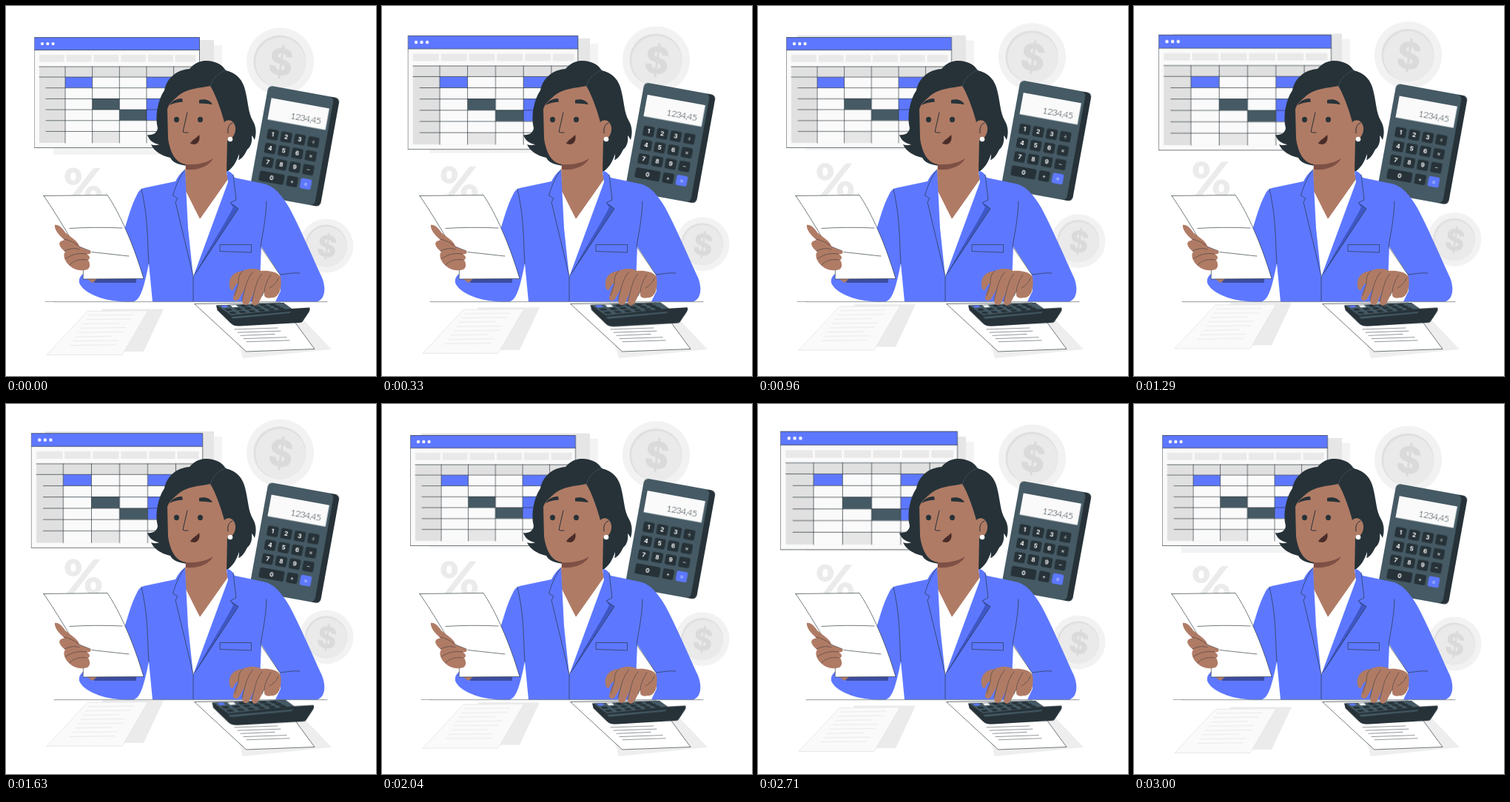
An HTML page for the animation above (3040 ms loop, 500 by 500 pixels).

```html
<!DOCTYPE html>
<html lang="en">
<head>
<meta charset="utf-8">
<title>Bookkeeping</title>
<style>
  html, body { margin: 0; width: 100%; height: 100%; overflow: hidden; background: #fff; }
  svg { display: block; width: 100vw; height: 100vh; }
  text { text-anchor: middle; }

  .float, .bob, .window, .pocket-calc, .line-end { animation: 3040ms linear infinite; }
  .float { animation-name: float; }
  .bob { animation-name: bob; }
  .window { animation-name: beat-late; transform-origin: 150px 117px; }
  .pocket-calc { animation-name: beat; transform-origin: 347px 416.5px; }
  .line-end { animation-name: blink; animation-timing-function: step-end; }

  /* 98.68% is the 3 s mark; the rest of the loop is a short hold. */
  @keyframes float {
    0%, 98.68%, 100% { transform: translateY(0); }
    49.34% { transform: translateY(-10px); }
  }
  @keyframes bob {
    0%, 49.34%, 98.68%, 100% { transform: translateY(0); }
    24.67%, 74.01% { transform: translateY(-10px); }
  }
  @keyframes beat {
    0%, 14.8%, 19.74%, 29.6%, 49.34%, 64.14%, 69.08%, 78.95%, 100% { transform: scale(1); }
    4.93%, 24.67%, 54.28%, 74.01% { transform: scale(1.1); }
  }
  @keyframes beat-late {
    0%, 2.47%, 12.34%, 32.07%, 46.87%, 51.81%, 61.68%, 81.41%, 96.21%, 100% { transform: scale(1); }
    7.4%, 37.01%, 56.74%, 86.35% { transform: scale(1.1); }
  }
  @keyframes blink {
    0%, 12.34%, 46.87%, 61.68%, 96.21%, 100% { opacity: 1; }
    2.47%, 32.07%, 51.81%, 81.41% { opacity: 0; }
  }

  .blue { fill: #5d78ff; }
  .dark { fill: #263238; }
  .slate { fill: #455a64; }
  .skin { fill: #b07b65; }
  .ink { fill: none; stroke: #263238; stroke-width: .65; stroke-linecap: round; stroke-linejoin: round; }
  .fine { stroke-width: .5; }
  .sign { font: 800 50px Inter, sans-serif; dominant-baseline: central; fill: #dadada; }
  .key { font: 700 8px Inter, sans-serif; dominant-baseline: central; fill: #fff; }
  .op { font-weight: 400; }
</style>
</head>
<body>
<svg viewBox="0 0 500 500">
  <!-- backdrop -->
  <g class="float">
    <path fill="#f3f3f3" d="M64 53H292V201H64Z"/>
    <path fill="#e6e6e6" d="M53 46H281V191H53Z"/>
    <text x="104.500" y="266" style="font:900 65px Lato,sans-serif" fill="#ebebeb">%</text>
    <g id="coin">
      <circle cx="370.500" cy="75" r="45.500" fill="#f2f2f2"/>
      <circle cx="370" cy="75" r="35.500" fill="#dfdfdf"/>
      <circle cx="371" cy="76.500" r="34" fill="#eaeaea"/>
      <text class="sign" transform="translate(371.500 75.500) rotate(8)">$</text>
    </g>
    <use href="#coin" transform="translate(433 324) scale(.8) translate(-370.500 -75)"/>
  </g>

  <!-- spreadsheet -->
  <g class="window">
    <path fill="#fafafa" d="M38.500 42.500H261.500V191.500H38.500Z"/>
    <path class="blue" d="M38.500 42.500H261.500V59.500H38.500Z"/>
    <g fill="#fff"><circle cx="49" cy="51" r="2.100"/><circle cx="56.300" cy="51" r="2.100"/><circle cx="63.600" cy="51" r="2.100"/></g>
    <g id="tabs" fill="#e9e9e9"></g>
    <path fill="#e0e0e0" d="M45 82H257V185H45Z"/>
    <path fill="#fafafa" d="M80 96H257V185H80Z"/>
    <path fill="#e6e6e6" d="M116.600 169.500H153.300V185H116.600Z"/>
    <path class="blue" d="M80 96h36.600v14.600H80ZM190 96h36.600v14.600H190ZM190 125h36.600v29.500H190Z"/>
    <path class="slate" d="M116.600 125H153.300V140H116.600ZM153.300 140H190V154.500H153.300Z"/>
    <path id="grid" class="ink"/>
    <path class="ink" d="M45 82H257M38.500 59.500H261.500M38.500 42.500H261.500V191.500H38.500Z"/>
  </g>

  <!-- large calculator -->
  <g class="bob">
    <g transform="translate(354.700 107.300) rotate(10.300)">
      <rect class="dark" x="2" width="96" height="149" rx="6"/>
      <rect class="slate" width="90" height="149" rx="6"/>
      <path fill="#fafafa" d="M7 16H86.500V45.500H7Z"/>
      <text x="57.500" y="38.500" style="font:300 12.500px Lato,sans-serif;letter-spacing:-.7px" fill="#263238">1234,45</text>
      <g id="keys"></g>
    </g>
  </g>

  <!-- desk papers -->
  <g class="float">
    <path fill="#ebebeb" d="M130 409.500H213L186 467H112Z"/>
    <path fill="#fafafa" stroke="#e4e4e4" stroke-width=".8" d="M110 412.500 192 411.500 157 471.500H55Z"/>
    <path id="faint" fill="none" stroke="#e6e6e6" stroke-width=".8"/>
  </g>
  <path fill="#eee" d="M257 406 300 404 320 476 440 464 400 422 376 408Z"/>
  <path class="ink" style="fill:#fff" d="M255 402.500 371 401 417 463.500 325 467Z"/>
  <path id="notes" class="ink fine"/>

  <!-- hair, face and neck -->
  <path class="dark" d="M268 74C283 73 293 80 297 87C313 91 320 101 323 113C328 133 327 144 334 156C339 165 338 174 336 181C334 177 333 176 332 175C333 183 331 190 326 194C322 202 318 207 314 208C315 205 315 202 315 200C311 212 306 219 299 224L245 216C231 214 225 211 222 205C209 202 200 196 196 187C201 189 205 188 207 187C199 186 193 181 191 174C198 175 204 172 205 165C201 149 205 127 214 114C218 95 233 86 248 85C254 78 260 75 268 74Z"/>
  <path class="skin" d="M218 139C221 130 227 127 233 121C245 111 262 111 276 108C282 117 290 138 295 157C301 151 309 156 310 164C311 173 305 181 299 181L298 226 303 240 262 288 240 250 243 214C230 212 222 200 219 179Z"/>
  <path fill="#7e5045" d="M243 214C257 215 271 212 280 206C274 217 261 222 243 221Z"/>
  <path class="ink" style="stroke:#455a64" d="M296 87C286 91 279 98 276 109"/>
  <path class="ink" d="M306 158C301 160 299 165 300 172M245 144 239 170Q242 172 246 171" style="stroke-width:1"/>
  <path class="dark" d="M221 134C225 127 232 125 238 125L239 129.500C233 130 227 131 221 134ZM261 127C269 125 276 127 279 133C273 132 267 131.500 261 131.500Z"/>
  <ellipse class="dark" cx="230.500" cy="153.500" rx="3.500" ry="3.700"/>
  <ellipse class="dark" cx="262.500" cy="153.500" rx="3.500" ry="3.700"/>
  <path fill="#4a2d2a" d="M249 186C251 181 257 179 261 174C263 180 260 187 254 187Z"/>
  <circle cx="303" cy="180" r="3.300" fill="#fff"/>

  <!-- suit -->
  <path fill="#fff" d="M243 230 241 246 262 288 300 234 303 260 253 367 236 262Z"/>
  <path class="blue" d="M242 221C236 225 232 231 229 237L191 245C184 246 180 248 177 255C169 270 165 287 160 302L115 358C102 360 98 367 99 374C104 388 132 399 160 399.500H172C182 398 187 378 193 348L198 399.500H342L345 325 370 363 371 385 364 399.500H420C431 397 433 382 427 367C410 330 397 299 383 273C373 256 363 244 350 240.500L309 232C307 227 303 223 298 223L300 238 253 366 246 300Z"/>
  <path fill="#3f57c5" d="M303 266 314 273.500 255 364C275 325 294 298 307 272Z"/>
  <path class="ink" d="M242 221C235 231 231 238 225.500 256L232 260 229 265 253 365V399M307 228 311 262 303 266 314 274 254 364M183 247C190 278 191 300 192 330L193 348M352 264C351 290 347 306 344 325L370 363C380 362 389 360 397 361M289.500 322.500H331.500V333L289.500 331.500Z"/>

  <!-- held sheet -->
  <path fill="#3d4da0" d="M108 367H176V374H120Z"/>
  <path class="skin" d="M108 368 117 374 124 368Z"/>
  <path class="ink" style="fill:#fff" d="M51 256.500 137 255.500C153 279 172 321 186 368.500L104 369C106 345 100 333 92 322C80 302 66 278 51 256.500Z"/>
  <path class="ink" d="M86 300.500C110 299 134 299 157 300M116 332.500 166 338"/>
  <path class="skin" d="M66 296C71 295 76 300 80 306C88 313 98 318 99 325L114 331C116 334 113 336 109 335C114 338 114 342 111 343C114 348 114 354 110 356C100 359 91 356 85 350C78 343 77 336 80 332C73 327 70 320 74 318L79 316C71 310 65 301 66 296Z"/>
  <path class="ink fine" d="M78 315C85 316 93 320 99 325M79 331C88 327 94 327 99 329M99 325 114 331M81 341C92 334 100 334 109 335M86 350C92 343 100 342 109 343"/>

  <!-- desk edge -->
  <path class="ink fine" d="M65 399.700H434"/>
  <path class="ink fine line-end" d="M53 399.700H65"/>

  <!-- small calculator -->
  <g class="pocket-calc">
    <path class="dark" d="M284 404.500 375 401 386 409 410 407.500Q411.500 410 409 414L401 426Q400 428 397 428L316 432.500Q308 433 304 429L285.500 411Z"/>
    <path class="slate" d="M285 404.500 375 401.500 385 409 304 418Z"/>
    <path class="slate" d="M304 420 385 413 383 415 307 422.500Z"/>
    <g id="pads"></g>
  </g>

  <!-- typing hand -->
  <path class="skin" d="M371 366C366 358 352 357 345 358C338 353 325 355 320 358C310 359 303 364 302 373C301 381 304 385 307 383.500C309 379 310 376 314 375C311 382 307 390 307 396C310 400 314 398 316 394L323 382C320 390 318 397 320 402C323 406 328 404 329 400L336 385C333 392 331 399 333 403C336 407 341 404 343 398L349 386C349 390 349 392 350 393C354 396 358 394 362 394C370 392 373 380 371 366Z"/>
  <path class="ink fine" d="M320 358C314 363 314 370 314 375L309 391M334 359C327 367 325 374 323 382L319 397M346 362C340 369 338 376 336 385L332 399M358 363C353 370 350 378 349 386L346 392M356 381C362 378 366 373 368 368"/>
</svg>
<script>
  const $ = id => document.getElementById(id);
  const each = (n, f) => Array.from({ length: n }, (_, i) => f(i)).join('');

  $('tabs').innerHTML = each(6, i =>
    `<rect x="${45 + i * 36.7}" y="66" width="${i == 5 ? 28 : 34}" height="9.500"/>`);

  $('grid').setAttribute('d',
    each(5, i => `M${80 + i * 36.65} 82V185`) +
    each(6, i => `M${i ? 54 : 45} ${96 + i * 14.7}H257`));

  // Key caps in the tilted frame of the large calculator
  const key = (label, x, y, w = 15, fill = '#263238') =>
    `<rect x="${x - w / 2}" y="${y - 6.5}" width="${w}" height="14" rx="2.500" fill="${fill}"/>
     <text class="key ${isNaN(label) ? 'op' : ''}" x="${x}" y="${y + .3}">${label}</text>`;
  const col = i => 17.5 + i * 18.6;
  $('keys').innerHTML =
    ['123÷', '456×', '789−'].map((row, r) =>
      [...row].map((c, i) => key(c, col(i), 64 + r * 19)).join('')).join('') +
    key('0', 26.5, 121.5, 34) + key('+', col(2), 121.5) + key('=', col(3), 121.5, 15, '#5d78ff');

  $('pads').innerHTML = each(18, n => {
    const c = n % 6, r = n / 6 | 0;
    const x = 290 + c * 13 + r * 5.5, y = 405 - c * .5 + r * 4.2 - c * r * .3;
    const fill = n == 0 ? '#5d78ff' : n == 1 ? '#fff' : '#263238';
    return `<path fill="${fill}" d="M${x} ${y}l7.500-.5 3.500 2.600-7.500 .7Z"/>`;
  });

  $('faint').setAttribute('d', each(8, i =>
    `M${111 - i * 3.6} ${418 + i * 5.8}l${i % 3 == 2 ? 50 : 62}-.8`));
  $('notes').setAttribute('d', each(5, i =>
    `M${309 + i * 4} ${437 + i * 4.2}l${i % 3 == 2 ? 46 : 58}-2`));
</script>
</body>
</html>
```
